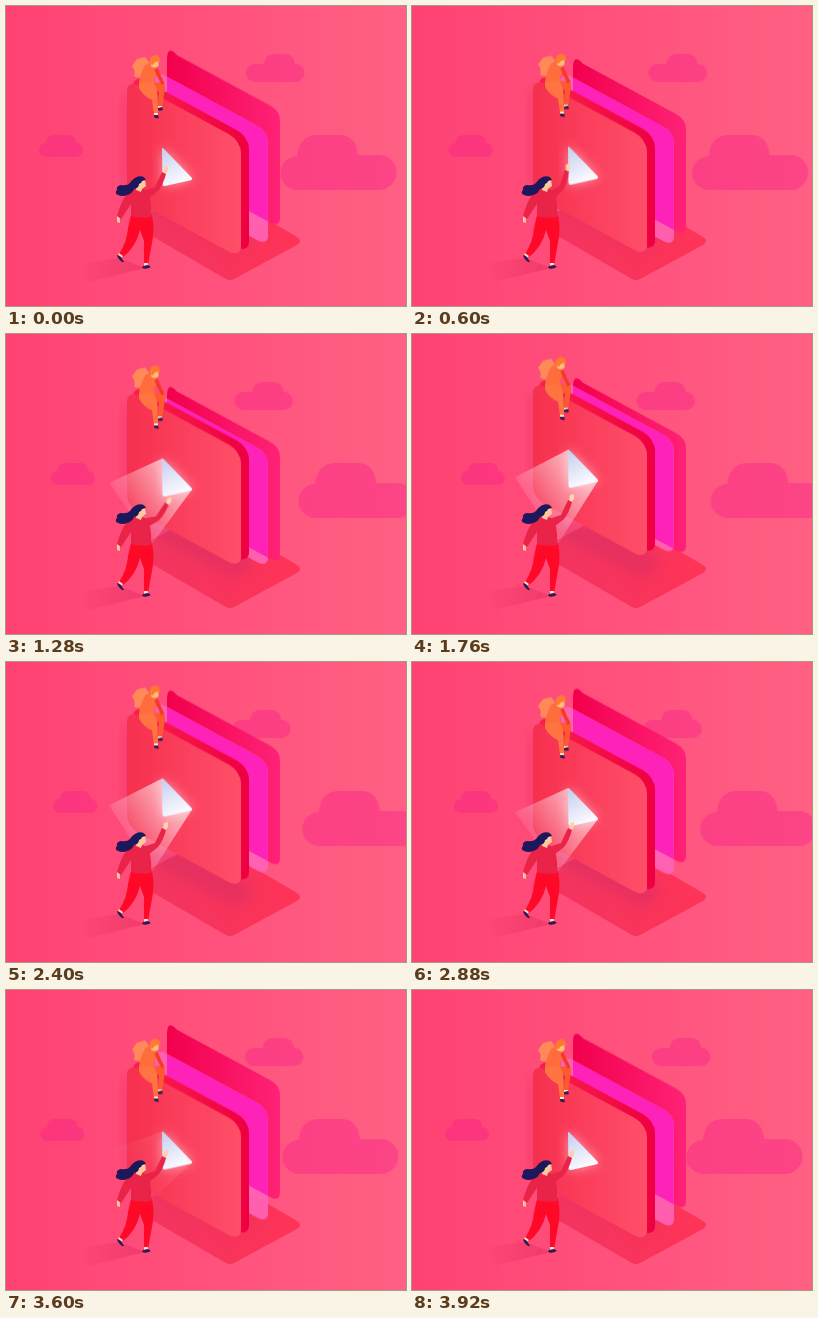
An HTML page that plays this animation: 400x300 px, repeating every 3960 ms.

```html
<!DOCTYPE html>
<html lang="en">
<head>
<meta charset="utf-8">
<title>Media panels</title>
<style>
  html, body { margin: 0; width: 100%; height: 100%; overflow: hidden; background: #ff4f78; }
  svg { position: fixed; left: 0; top: 0; width: 400px; height: 300px; display: block; }

  .lift, .drift, .beam, .arm { animation: 3960ms infinite; animation-timing-function: cubic-bezier(.333, 0, .667, 1); }
  .lift { animation-name: lift; }
  .mid { animation-delay: -3560ms; }
  .back { animation-delay: -3160ms; }
  .drift { animation-name: drift; }
  .beam { animation-name: aim, shine; }
  .arm { animation-name: swipe; transform-origin: 140px 189px; }

  @keyframes lift {
    0%, 10.1% { transform: translateY(0); }
    46.5%, 56.5% { transform: translateY(-26.5px); }
    94%, 100% { transform: translateY(0); }
  }
  @keyframes drift {
    0%, 99%, 100% { transform: translateX(0); }
    49.5% { transform: translateX(var(--dx)); }
  }
  @keyframes aim {
    0%, 10.1% { d: path("M156 142L186 173L146 210L103 161Z"); }
    46.5%, 56.5% { d: path("M156 115.5L186 146.5L146 210L103 143Z"); }
    94%, 100% { d: path("M156 142L186 173L146 210L103 161Z"); }
  }
  @keyframes shine {
    0%, 17% { opacity: 0; }
    29%, 80% { opacity: 1; }
    95%, 100% { opacity: 0; }
  }
  @keyframes swipe {
    0%, 4% { transform: rotate(0); }
    15% { transform: rotate(-8deg); }
    32% { transform: rotate(8deg); }
    44%, 74% { transform: rotate(0); }
    83% { transform: rotate(2deg); }
    93%, 100% { transform: rotate(0); }
  }
</style>
</head>
<body>
<svg viewBox="0 0 400 300">
  <defs>
    <linearGradient id="sky"><stop stop-color="#ff4274"/><stop offset="1" stop-color="#ff6084"/></linearGradient>
    <linearGradient id="face"><stop stop-color="#f6304f"/><stop offset="1" stop-color="#ff4f69"/></linearGradient>
    <linearGradient id="edge"><stop stop-color="#fb1f4c"/><stop offset="1" stop-color="#ee0040"/></linearGradient>
    <linearGradient id="rear"><stop stop-color="#f2004d"/><stop offset="1" stop-color="#ff2276"/></linearGradient>
    <linearGradient id="floor"><stop stop-color="#f03560"/><stop offset="1" stop-color="#ff3358"/></linearGradient>
    <linearGradient id="play" x1="0" y1="0" x2=".4" y2="1"><stop stop-color="#c3cdee"/><stop offset="1" stop-color="#fcfbff"/></linearGradient>
    <linearGradient id="ray" gradientUnits="userSpaceOnUse" x1="172" y1="146" x2="120" y2="184">
      <stop stop-color="#fff" stop-opacity=".6"/><stop offset="1" stop-color="#fff" stop-opacity=".04"/>
    </linearGradient>
    <linearGradient id="cast" x1="1" x2="0"><stop stop-color="#e0285c" stop-opacity=".5"/><stop offset="1" stop-color="#e0285c" stop-opacity="0"/></linearGradient>
    <filter id="soft" x="-30%" y="-30%" width="160%" height="160%"><feGaussianBlur stdDeviation="6"/></filter>
    <path id="tri" d="M156 143.5Q156 141 158 143L185.5 171.5Q187 173.5 184.8 174.3L159 180Q156.5 180.5 156.5 178Z"/>
    <path id="rearPanel" d="M161 62.3Q161 47 171 57.7L264 107.9Q274 113.3 274 123.3V220.3Q274 230.3 264 224.9L171 174.7Q161 169.3 161 159.3Z"/>
    <rect id="midPanel" width="113" height="114.5" rx="10" transform="translate(149 65.2) skewY(28.4)"/>
    <clipPath id="behind"><use class="lift back" href="#rearPanel"/></clipPath>
  </defs>

  <rect width="400" height="300" fill="url(#sky)"/>

  <g fill="#f81f8a" opacity=".4">
    <g class="drift" style="--dx:16.3px"><path d="M40 137Q40 129 48 129H62Q70 129 70 137A7 7 0 0 1 70 151H40A7 7 0 0 1 40 137Z"/></g>
    <g class="drift" style="--dx:-16px"><path d="M249 58H258Q259 48 268 48H279Q288 48 289 58A9 9 0 0 1 290 76H249A9 9 0 0 1 249 58Z"/></g>
    <g class="drift" style="--dx:25px"><path d="M291 150Q293 129 312 129H333Q350 129 352 149H373A17.5 17.5 0 0 1 373 184H292A17 17 0 0 1 291 150Z"/></g>
  </g>

  <path d="M132 213L194 180Q199 177 204 180L291 231Q297 235 291 239L229 272.5Q224 276 219 272.5L132 222Q125 217 132 213Z" fill="url(#floor)"/>
  <path d="M130 192L232 246L250 230L205 190Z" fill="#c52a68" opacity=".32" filter="url(#soft)"/>

  <use class="lift back" href="#rearPanel" fill="url(#rear)"/>
  <use class="lift mid" href="#midPanel" fill="#ff64b8" opacity=".9"/>
  <g clip-path="url(#behind)">
    <use class="lift mid" href="#midPanel" fill="#ff22b8"/>
  </g>

  <g class="lift">
    <path d="M117 88H130V180H117Z" fill="#e0285c" opacity=".3" filter="url(#soft)"/>
    <rect width="116" height="117" rx="12" transform="translate(127 68) skewY(28.4)" fill="url(#edge)"/>
    <rect width="114" height="117.5" rx="12" transform="translate(121 73) skewY(28.4)" fill="url(#face)"/>
    <use href="#tri" fill="#fff" opacity=".5" filter="url(#soft)"/>
  </g>
  <path class="beam" d="M156 142L186 173L146 210L103 161Z" fill="url(#ray)"/>

  <g class="lift">
    <use href="#tri" fill="url(#play)"/>
    <!-- seated figure -->
    <path d="M126 60L131 53L139 51L143 56L138 70Q132 73 128 70Q130 65 126 60Z" fill="#ff8a58"/>
    <path d="M135 78L155 76Q160 77 159 83L156 102H152L153 86Z" fill="#fb5a32"/>
    <path d="M133 82Q132 72 139 59Q143 55 149 60L152 66L148 72L149 83Z" fill="#ff6d3c"/>
    <path d="M150 63L153 70L157 78" fill="none" stroke="#f43a22" stroke-width="3.5"/>
    <path d="M133 77L147 76Q152 83 151.500 92L152 108H148L146 94Q137 90 133 82Z" fill="#ff7440"/>
    <path d="M145 55H152.500V60Q149 63 145 60Z" fill="#ffc07a"/>
    <path d="M143.500 58Q143 50 149 49Q155 50 154 56Q149 54 147 59Z" fill="#ff7a30"/>
    <path d="M148 107H152V109.500H148ZM152 100H156V102H152Z" fill="#ffe3c8"/>
    <path d="M148 109H152L153 112Q150 113 148 111ZM152 102L156 101L157 104Q154 105 152 104Z" fill="#3a1d4d"/>
  </g>

  <!-- standing figure -->
  <path d="M139 262L113 252L72 258L82 276Z" fill="url(#cast)"/>
  <path d="M125 209H146Q149 224 146 237L142 259H138L138 235L134 224Q130 241 117 251L113 248Q121 236 122 222Z" fill="#fe0a28"/>
  <path d="M113 247L117 250L115 252L112 249ZM138 257H142V260H138Z" fill="#ffd9c4"/>
  <path d="M112 249L115 251L118 256Q115 257 111 250ZM137 260L142 259L145 261Q140 264 136 262Z" fill="#2a1a55"/>
  <path d="M111 210L114 211L114 217L111 216Z" fill="#ffc9a0"/>
  <path d="M127 183Q136 181 142 186Q146 196 145 211Q135 213 125 210L125 198L115 213L111 210Q117 188 127 183Z" fill="#ea2349"/>
  <g class="arm">
    <path d="M157 166L158 161L162 160L162 165L159 169Z" fill="#ffd0ae"/>
    <path d="M137 185L149 181L156 166L160 168Q157 179 152 185L142 193Z" fill="#ea2349"/>
  </g>
  <path d="M131 174L139 173L140 180L136 183L135 186L130 184Z" fill="#ffc9a0"/>
  <path d="M140 174Q138 169 132 170.500Q127 172 124 177Q121 180 115 179Q110 180 111 184Q108 187 112 189Q117 191 121 189Q126 188 128 183Q133 182 133 178Q136 177 136 175Z" fill="#1d185c"/>
</svg>
</body>
</html>
```
